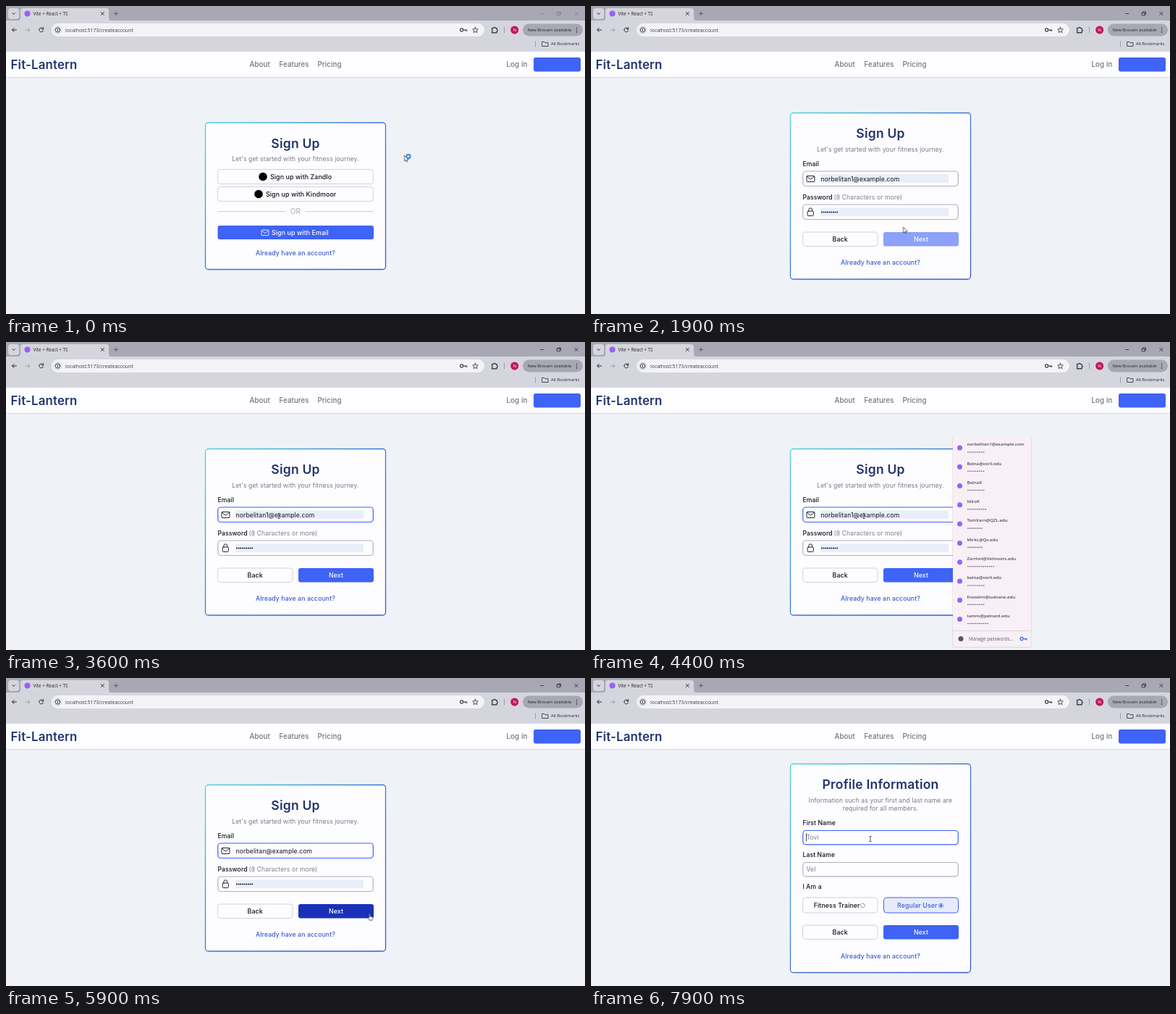
Recreate the animation shown at these times as an HTML page. Size 800x425 px, loop 8 s.

```html
<!DOCTYPE html>
<html lang="en">
<head>
<meta charset="utf-8">
<title>Sign up flow</title>
<style>
html, body { margin: 0; width: 100%; height: 100%; overflow: hidden; background: #eff3f8; }
svg { display: block; }
text { font: 400 8.6px Inter, sans-serif; letter-spacing: .012em; fill: #111318; }
.ui text { font: 400 6.3px "Open Sans", "Noto Sans", sans-serif; letter-spacing: 0; fill: #24262c; }
.ui text.url { font-size: 6.87px; fill: #3a3c44; }
.ui text.small { font-size: 5.9px; }
.ui text.saved { font-weight: 600; font-size: 6.1px; fill: #4a4c58; }
.mid { text-anchor: middle; }
text.brand { font-size: 16.8px; font-weight: 600; fill: #22346b; }
text.title { font-size: 17.5px; font-weight: 600; fill: #22346b; text-anchor: middle; }
text.nav { font-size: 9.7px; font-weight: 500; fill: #6d7281; }
text.sub { fill: #757a88; text-anchor: middle; }
text.hint { fill: #7b808c; }
text.btn { font-size: 8.8px; font-weight: 500; }
text.label { font-weight: 500; }
text.white { fill: #fff; }
text.link { font-size: 8.7px; font-weight: 500; fill: #3a5bd0; text-anchor: middle; }
.line { fill: none; stroke: #24262c; stroke-width: 1; stroke-linecap: round; stroke-linejoin: round; }
.card { fill: #fdfcfe; stroke: url(#edge); stroke-width: 1.3; }
.box { fill: #fdfcfe; stroke: #cfd2da; }
.field { fill: #fdfcfe; stroke: #b0b3bc; stroke-width: 1.2; }
.primary { fill: #3e63f5; }
.autofill { fill: #e8eefa; }

/* One loop is 8 s, so 1% is 80 ms. */
.a { animation: 8s step-end infinite; }
.welcome { animation-name: welcome; }
@keyframes welcome { 0% { opacity: 1 } 23.75%, 100% { opacity: 0 } }
.account { animation-name: account; }
@keyframes account { 0% { opacity: 0 } 23.75% { opacity: 1 } 81.25%, 100% { opacity: 0 } }
.profile { animation-name: profile; }
@keyframes profile { 0% { opacity: 0 } 81.25%, 100% { opacity: 1 } }
.controls { animation-name: controls; }
@keyframes controls { 0% { stroke: #80828e } 22.5%, 100% { stroke: #24262c } }
.focus { animation-name: focus; }
@keyframes focus { 0% { stroke: #b0b3bc } 43.75%, 100% { stroke: #3e63f5 } }
.focus2 { animation-name: focus2; }
@keyframes focus2 { 0% { stroke: #b0b3bc } 95%, 100% { stroke: #3e63f5 } }
.caret { animation-name: caret; }
@keyframes caret { 0% { opacity: 0 } 95%, 100% { opacity: 1 } }
.before { animation-name: before; }
@keyframes before { 0% { opacity: 1 } 60%, 100% { opacity: 0 } }
.after { animation-name: after; }
@keyframes after { 0% { opacity: 0 } 60%, 100% { opacity: 1 } }
.next { animation: next 8s linear infinite; }
@keyframes next {
  0%, 25.6% { fill: #8ba2f8 } 27.5% { fill: #5474f5 } 29.4%, 70% { fill: #3e63f5 }
  71.9%, 100% { fill: #1a30b8 }
}
.popup { animation: popup 8s linear infinite; }
@keyframes popup { 0%, 52.5% { opacity: 0 } 54.4%, 61.25% { opacity: 1 } 63.75%, 100% { opacity: 0 } }
.pointer { animation: path 8s ease-in-out infinite; }
@keyframes path {
  0%, 3% { transform: translate(550.5px, 206px) }
  14%, 24% { transform: translate(431.5px, 305px) }
  27.5% { transform: translate(420px, 307px) }
  38%, 57.5% { transform: translate(377px, 240px) }
  61.5%, 63.5% { transform: translate(468.5px, 210px) }
  71%, 85% { transform: translate(502.5px, 325px) }
  93%, 100% { transform: translate(386px, 222px) }
}
.busy { animation-name: busy; }
@keyframes busy { 0% { opacity: 1 } 7.5%, 100% { opacity: 0 } }
.arrow { animation-name: arrow; }
@keyframes arrow {
  0% { opacity: 1 } 12.5% { opacity: 0 } 23.75% { opacity: 1 } 35% { opacity: 0 }
  59.4% { opacity: 1 } 70% { opacity: 0 } 81.25% { opacity: 1 } 91.5%, 100% { opacity: 0 }
}
.hand { animation-name: hand; }
@keyframes hand { 0% { opacity: 0 } 12.5% { opacity: 1 } 23.75% { opacity: 0 } 70% { opacity: 1 } 81.25%, 100% { opacity: 0 } }
.beam { animation-name: beam; }
@keyframes beam { 0% { opacity: 0 } 35% { opacity: 1 } 59.4% { opacity: 0 } 91.5%, 100% { opacity: 1 } }
</style>
</head>
<body>
<svg width="800" height="425" viewBox="0 0 800 425">
  <defs>
    <linearGradient id="edge" x1="0" y1="0" x2="1" y2="1">
      <stop offset="0" stop-color="#4fd6d6"/>
      <stop offset=".5" stop-color="#3f74d8"/>
      <stop offset="1" stop-color="#3a58d6"/>
    </linearGradient>
    <g id="mail" class="line">
      <rect x=".5" y=".5" width="11" height="8" rx="1" stroke="inherit"/>
      <path d="M.8 1.3 6 5.2 11.2 1.3"/>
    </g>
    <g id="key" fill="none" stroke="currentColor" stroke-width="1.1">
      <circle cx="2.6" cy="3" r="2.1"/>
      <path d="M4.7 3H9.5V5M7.5 3V4.8"/>
    </g>
  </defs>

  <rect width="800" height="425" fill="#eff3f8"/>

  <!-- Browser frame -->
  <g class="ui">
    <rect width="800" height="24" fill="#a7a8b4"/>
    <rect y="20" width="800" height="43" fill="#d5d6dd"/>
    <path d="M16 20.500Q20 20 20 16V7Q20 3 24 3H138Q142 3 142 7V16Q142 20 146 20.500Z" fill="#d5d6dd"/>
    <rect x="3" y="3" width="15" height="15" rx="4" fill="#d5d6dd"/>
    <path class="line" d="M8.800 9.700 10.600 11.500 12.400 9.700"/>
    <circle cx="29.500" cy="10.500" r="4" fill="#9561ff"/>
    <text x="37.500" y="12.900">Vite + React + TS</text>
    <path class="line" d="M131.300 8.500l4 4m0-4-4 4"/>
    <path class="line" d="M149.500 10.500h5m-2.500-2.500v5" style="stroke:#4a4c56;stroke-width:.8"/>
    <g class="line a controls" style="stroke-width:.8">
      <path d="M738.500 10.500h4.500M785.800 8.300l4.400 4.400m0-4.400-4.400 4.400"/>
      <path d="M761.500 9h3.800v3.800h-3.800zM762.700 9V8h3.700v3.700h-1"/>
    </g>

    <path class="line" d="M14.300 33H8.600m2.500-2.600L8.500 33l2.600 2.600"/>
    <path class="line" d="M27.200 33h5.700m-2.500-2.600L33 33l-2.600 2.600" style="stroke:#9b9da8"/>
    <path class="line" d="M51.200 31.300A2.900 2.900 0 1 0 51.500 34M51.600 29.800v2.200h-2.200"/>
    <rect x="63" y="24" width="598" height="18" rx="9" fill="#f4f3f8"/>
    <circle cx="71.500" cy="33" r="6" fill="#dfe0e7"/>
    <circle class="line" cx="71.500" cy="33" r="3.200" style="stroke-width:.8"/>
    <path class="line" d="M71.500 32.800v1.600M71.500 31.400v.1" style="stroke-width:.8"/>
    <text class="url" x="82" y="35.800">localhost:5173/createaccount</text>
    <use href="#key" x="627" y="30" color="#3a3c44"/>
    <path class="line" d="M648.500 29.300l1.150 2.500 2.700.3-2 1.850.55 2.700-2.400-1.350-2.400 1.350.55-2.700-2-1.850 2.700-.3z" style="stroke-width:.8"/>
    <path class="line" d="M671.500 30.500h2.200a1.200 1.200 0 0 1 2.400 0h2v2a1.200 1.200 0 0 1 0 2.400v2h-6.600v-2.200a1.200 1.200 0 0 0 0-2.200z" style="stroke-width:1.1"/>
    <path d="M688.500 29v8M731.500 48.500v8" stroke="#9b9da8"/>
    <circle cx="702.700" cy="33" r="5.500" fill="#c2185b"/>
    <text class="small mid" x="702.700" y="35" style="fill:#fff">N</text>
    <rect x="714" y="24.500" width="83" height="17" rx="8.500" fill="#a7a8b4"/>
    <text class="small" x="720.500" y="35.100">New Brovam available</text>
    <path class="line" d="M788.500 30.200v.1M788.500 33v.1M788.500 35.800v.1" style="stroke-width:1.500"/>
    <path class="line" d="M741 49.500h3l1 1.200h4v4.800h-8z" style="stroke-width:.8"/>
    <text class="small" x="753" y="54.300">All Bookmarks</text>
  </g>

  <!-- Site header -->
  <rect y="63" width="800" height="35.500" fill="#fefdff"/>
  <path d="M0 98.500H800" stroke="#d6d9e2"/>
  <text class="brand" x="6.500" y="87">Fit-Lantern</text>
  <text class="nav" x="336.500" y="83.500">About</text>
  <text class="nav" x="377.500" y="83.500">Features</text>
  <text class="nav" x="430.500" y="83.500">Pricing</text>
  <text class="nav" x="691.500" y="83.500">Log in</text>
  <rect class="primary" x="729" y="71" width="65" height="19.500" rx="3"/>

  <g class="a welcome">
    <rect class="card" x="275.500" y="161" width="249" height="202.500" rx="4"/>
    <text class="title" x="400" y="196">Sign Up</text>
    <text class="sub" x="400" y="214">Let's get started with your fitness journey.</text>
    <rect class="box" x="292.500" y="225.500" width="215" height="20" rx="4"/>
    <circle cx="355" cy="235.500" r="5.800"/>
    <text class="btn" x="365" y="238.600">Sign up with Zandlo</text>
    <rect class="box" x="292.500" y="249.500" width="215" height="20" rx="4"/>
    <circle cx="349" cy="259.500" r="5.800"/>
    <text class="btn" x="359" y="262.600">Sign up with Kindmoor</text>
    <path d="M293 283.500h93.500M413.500 283.500h94" stroke="#cdd0d9"/>
    <text class="mid" x="400" y="287" style="font-size:10px;fill:#a9adb9">OR</text>
    <rect class="primary" x="292.500" y="303" width="215.500" height="19" rx="3"/>
    <g fill="none" stroke="#fff" stroke-width=".8">
      <rect x="353" y="309" width="10" height="7.500" rx="1"/>
      <path d="M353.300 310l4.700 3.500 4.700-3.500"/>
    </g>
    <text class="btn white" x="367" y="315.700">Sign up with Email</text>
    <text class="link" x="400" y="343.500">Already have an account?</text>
  </g>

  <g class="a account">
    <rect class="card" x="275.500" y="147.500" width="249" height="229.500" rx="4"/>
    <text class="title" x="400" y="182.300">Sign Up</text>
    <text class="sub" x="400" y="200.500">Let's get started with your fitness journey.</text>
    <text class="label" x="292.500" y="220.500">Email</text>
    <rect class="field a focus" x="292.800" y="228" width="214.500" height="20.500" rx="4"/>
    <use href="#mail" x="297.500" y="234"/>
    <g class="a before">
      <rect class="autofill" x="317" y="232.500" width="177" height="11.500"/>
      <text x="317.500" y="241.500">norbelitan1@example.com</text>
    </g>
    <text class="a after" x="317.500" y="241.500">norbelitan@example.com</text>
    <text class="label" x="292.500" y="266.500">Password</text>
    <text class="hint" x="335.500" y="266.500">(8 Characters or more)</text>
    <rect class="field" x="292.800" y="274" width="214.500" height="20.500" rx="4"/>
    <rect class="line" x="299.200" y="283" width="8.200" height="6.500" rx="1"/>
    <path class="line" d="M300.900 283v-1.800a2.400 2.400 0 0 1 4.800 0V283"/>
    <rect class="autofill" x="317" y="278.500" width="177" height="11.500"/>
    <path d="M319 284.500h22" stroke="#111318" stroke-width="1.900" stroke-linecap="round" stroke-dasharray="0 2.650"/>
    <rect class="box" x="292.500" y="312" width="103.500" height="19.500" rx="4"/>
    <text class="btn mid" x="344.200" y="324.900">Back</text>
    <rect class="next" x="404" y="312" width="104" height="19.500" rx="3"/>
    <text class="btn white mid" x="456" y="324.900">Next</text>
    <text class="link" x="400" y="357.300">Already have an account?</text>
  </g>

  <g class="a profile">
    <rect class="card" x="275.500" y="118.500" width="249" height="288" rx="4"/>
    <text class="title" x="400" y="153.300">Profile Information</text>
    <text class="sub" x="400" y="171.500">Information such as your first and last name are</text>
    <text class="sub" x="400" y="183.300">required for all members.</text>
    <text class="label" x="292.500" y="203">First Name</text>
    <rect class="field a focus2" x="292.800" y="210.500" width="214.500" height="19.300" rx="4"/>
    <text class="hint" x="297.500" y="223.200">Tovi</text>
    <path class="a caret" d="M297.500 214.500v11" stroke="#111318" stroke-width=".8"/>
    <text class="label" x="292.500" y="247.300">Last Name</text>
    <rect class="field" x="292.800" y="254.500" width="214.500" height="19.300" rx="4"/>
    <text class="hint" x="297.500" y="267.300">Vel</text>
    <text class="label" x="292.500" y="291.300">I Am a</text>
    <rect class="box" x="292.500" y="303" width="103.500" height="21" rx="4"/>
    <text class="btn" x="307.700" y="316.500">Fitness Trainer</text>
    <circle cx="375.400" cy="314" r="2.900" fill="#fff" stroke="#767a84" stroke-width=".7"/>
    <rect x="404.500" y="303" width="103" height="21" rx="4" fill="#e6ebfb" stroke="#4767e0"/>
    <text class="btn" x="423" y="316.500" style="fill:#3f60d2">Regular User</text>
    <circle cx="483.500" cy="314" r="2.900" fill="#fff" stroke="#2f68e0" stroke-width=".8"/>
    <circle cx="483.500" cy="314" r="1.700" fill="#2f68e0"/>
    <rect class="box" x="292.500" y="341" width="103.500" height="19.500" rx="4"/>
    <text class="btn mid" x="344.200" y="353.900">Back</text>
    <rect class="primary" x="404" y="341" width="104" height="19.500" rx="3"/>
    <text class="btn white mid" x="456" y="353.900">Next</text>
    <text class="link" x="400" y="386.500">Already have an account?</text>
  </g>

  <!-- Saved passwords -->
  <g class="ui popup">
    <rect x="499" y="131" width="110" height="291" rx="4" fill="#5a5a70" opacity=".12"/>
    <rect x="500" y="131" width="108" height="289.500" rx="3" fill="#f8eff7"/>
    <g id="rows"></g>
    <path d="M500 398.500h108" stroke="#dcd5e0"/>
    <circle cx="511" cy="409.500" r="3.500" fill="#55575f"/>
    <text x="522" y="412" style="fill:#5a5c68">Manage passwords...</text>
    <use href="#key" x="592.500" y="406.500" color="#2f68e0"/>
  </g>

  <g class="pointer">
    <g class="a arrow">
      <path d="M0 0V8.200L1.900 6.500 3.100 9.100 4.300 8.500 3.200 6H5.700Z" fill="#fff" stroke="#22242a" stroke-width=".7"/>
    </g>
    <circle class="a busy" cx="5.500" cy="1.500" r="2.700" fill="#cfe6fb" stroke="#2a7fd0" stroke-width="1.700"/>
    <path class="a hand" d="M-.8.800Q0-.4.800.800V4L3.800 4.700Q4.600 5 4.400 6.200L3.700 9.200H-.2L-2.600 6Q-2.400 4.800-.8 6Z" fill="#fff" stroke="#22242a" stroke-width=".7"/>
    <path class="a beam" d="M-1.500-3.500H1.500M0-3.500V3.500M-1.500 3.500H1.500" fill="none" stroke="#33353c" stroke-width=".8"/>
  </g>
</svg>
<script>
const saved = [
  ["norbelitan1@example.com", 9], ["Belna@vorli.edu", 9], ["BelnaK", 9], ["IdiroK", 10],
  ["TomVarn@QZL.edu", 8], ["MirkL@Qv.edu", 8], ["Zarrlon@Velmoors.edu", 14],
  ["belna@vorli.edu", 9], ["frostelm@ludvane.edu", 9], ["tamro@pelnard.edu", 11]
];
document.getElementById("rows").innerHTML = saved.map(([name, dots], i) => {
  const y = 141 + i * 26.28;
  return `<circle cx="509.500" cy="${y + 5}" r="3.500" fill="#9561ff"/>
    <text class="saved" x="519.500" y="${y + 2.3}">${name}</text>
    <path d="M521 ${y + 11}h${(dots - 1) * 2.7 + .1}" stroke="#4a4c58" stroke-width="1.600"
      stroke-linecap="round" stroke-dasharray="0 2.700"/>`;
}).join("");
</script>
</body>
</html>
```
